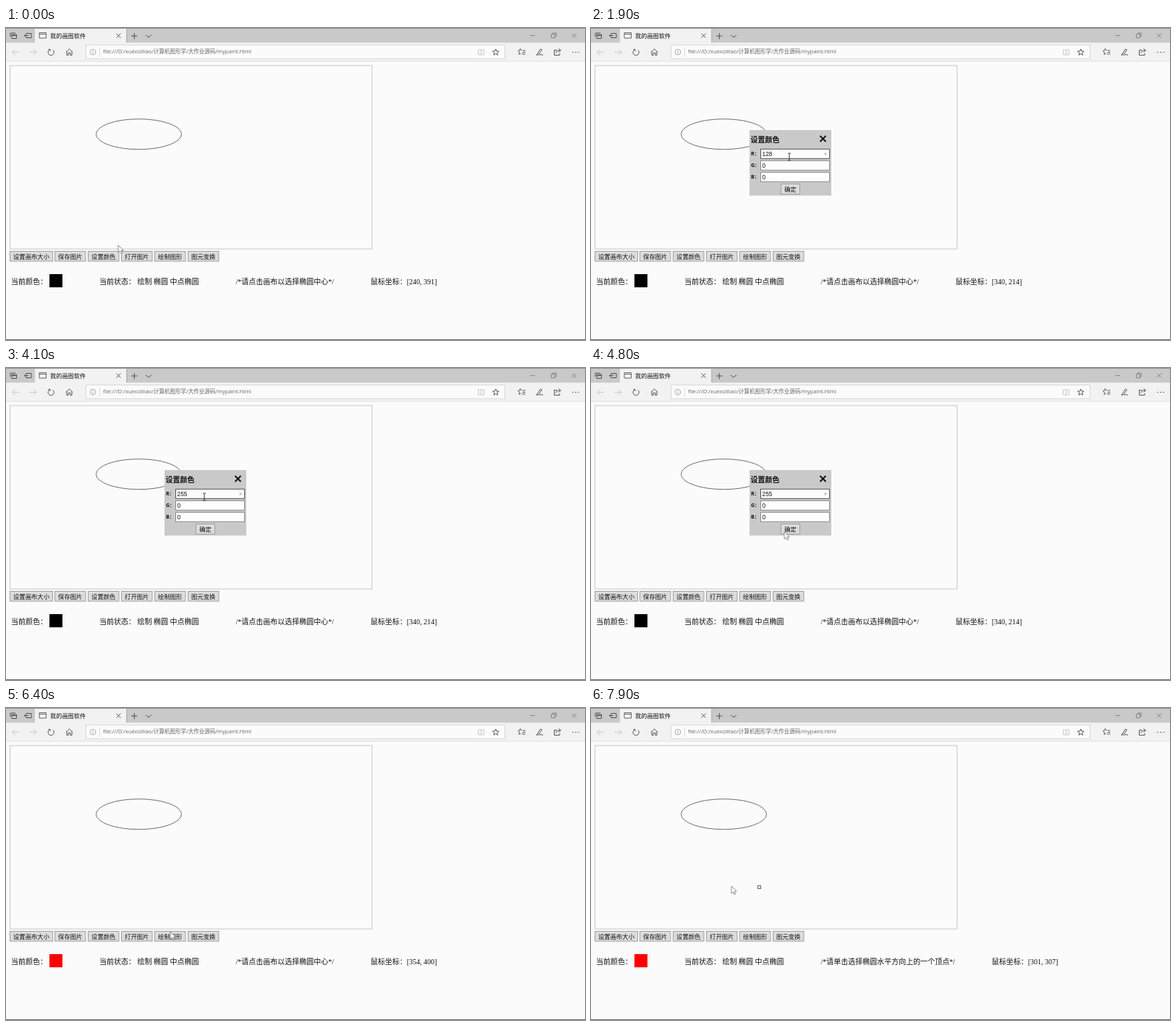
An HTML page for the animation above (8 s loop, 800 px wide and 431 px high).

```html
<!DOCTYPE html>
<html lang="zh-CN">
<head>
<meta charset="utf-8">
<title>我的画图软件</title>
<style>
  html, body { margin: 0; width: 100%; height: 100%; overflow: hidden; background: #fbfbfb; }
  svg { display: block; width: 100vw; height: 100vh; }
  text { fill: #111; white-space: pre; }
  .ui { font-family: "Open Sans", "Noto Sans CJK SC", "Noto Sans CJK", sans-serif; }
  .page { font: 10px "Liberation Serif", "Noto Sans CJK SC", "Noto Sans CJK", serif; }
  .control { font: 8.33px "Liberation Sans", "Noto Sans CJK SC", "Noto Sans CJK", sans-serif; }
  .bold { font-weight: bold; }
  .icon { fill: none; stroke: #444; stroke-width: .9; }
  .faint { stroke: #c4c4c4; }
  .window { stroke: #777; stroke-width: .8; }
  .button { fill: #dcdcdc; stroke: #a0a0a0; }
  .field { fill: #fdfdfd; stroke: #8c8c8c; }
  .field.focused { stroke: #555; }
</style>
</head>
<body>
<svg viewBox="0 0 800 431" preserveAspectRatio="none">
  <rect width="800" height="431" fill="#fbfbfb"/>

  <!-- title bar -->
  <rect width="800" height="20.5" fill="#c9c9c9"/>
  <rect width="800" height="1" fill="#909090"/>
  <rect x="40" y="1" width="126" height="20" fill="#f2f2f2"/>
  <g class="icon">
    <path d="M6 12V7H13M8 9H14.5V14.5H8ZM8 10.5H14.5"/>
    <path d="M28 7.5H35V13.5H28M28 7.5V9M28 13.5V12M25.5 10.5H31M27.5 8.5L25.5 10.5L27.5 12.5"/>
    <path d="M46 6.5H55.5V14H46ZM46 8.5H55.5" stroke="#555"/>
    <path d="M152.5 7.5L158.5 13.5M158.5 7.5L152.5 13.5"/>
    <path d="M173 11H181.5M177.3 7V15.5M193 9.5L197 13L201 9.5"/>
    <path class="window" d="M724.5 10.5H731M753.5 8.5H758.5V13.5H753.5ZM755.5 8.5V6.8H760.3V11.5H758.5M782 7.5L788 13.5M788 7.5L782 13.5"/>
  </g>
  <path d="M167 2V20" stroke="#b0b0b0"/>
  <text class="ui" x="61" y="13.5" font-size="8.2">我的画图软件</text>

  <!-- toolbar -->
  <rect y="20.5" width="800" height="25.5" fill="#f2f2f2"/>
  <path d="M0 46H800" stroke="#dedede"/>
  <rect x="110.5" y="23.5" width="579" height="19" fill="#fbfbfb" stroke="#d8d8d8"/>
  <path d="M129.5 27V40" stroke="#ddd"/>
  <g class="icon">
    <path class="faint" d="M18 33.5H8.5M12.5 29.5L8.5 33.5L12.5 37.5"/>
    <path class="faint" d="M32.5 33.5H42M38 29.5L42 33.5L38 37.5"/>
    <path d="M60 30.2A4.1 4.1 0 1 0 64.8 30.5M58.5 29.5H61V32"/>
    <path d="M82.8 33.5L87.5 29L92.2 33.5M84 32.5V37.5H86.2V34.3H88.8V37.5H91V32.5"/>
    <circle cx="120" cy="33.3" r="3.9" stroke="#999" stroke-width=".8"/>
    <path d="M120 32.5V35.5M120 30.8V31.6" stroke="#999" stroke-width=".8"/>
    <path class="faint" d="M652.5 30H660.5V37H652.5ZM656.5 30V37"/>
    <path id="star"/>
    <path d="M714 31H717.5M713.5 33.5H717.5M713 36H717.5M713 31L711.5 30.5L710.5 28.5L709.5 31L707.5 31.5L709.3 33.5L709 36.5L711.5 35"/>
    <path d="M733 37.5L738.5 29L740.5 30.2L736 36.5L733 37.5M736.5 37.5Q739 35.500 742 37.5"/>
    <path d="M761 30.5H757.5V37.5H765V35M759.5 34.5Q760.5 31 764 31H766M763.5 28.5L766.5 31L763.5 33.5"/>
  </g>
  <path d="M782.5 33.5H784M786.5 33.5H788M790.5 33.5H792" stroke="#444" stroke-width="1.2"/>
  <text class="ui" x="134" y="34.8" font-size="7.5" style="fill:#666">file:///D:/xuexiziliao/计算机图形学/大作业源码/mypaint.html</text>

  <!-- drawing area -->
  <rect x="5.5" y="51.9" width="500.3" height="253.3" fill="#fbfbfb" stroke="#c8c8c8"/>
  <ellipse cx="183.5" cy="146.7" rx="59" ry="21" fill="none" stroke="#555" stroke-width=".85"/>
  <rect id="marker" x="230.5" y="245.5" width="4" height="4" fill="none" stroke="#555" stroke-width=".9"/>
  <g id="buttons"></g>

  <!-- status line -->
  <g class="page">
    <text x="7" y="353.5">当前颜色：</text>
    <rect id="swatch" x="60" y="340" width="18" height="18.2"/>
    <text x="129" y="353.5">当前状态： 绘制 椭圆 中点椭圆</text>
    <text id="hint" x="317.5" y="353.5"></text>
    <text id="readout" y="353.5"></text>
  </g>

  <g id="dialog">
    <rect x="219" y="141" width="113" height="90.5" fill="#c9c9c9"/>
    <text class="ui bold" x="220.5" y="157.7" font-size="10">设置颜色</text>
    <path d="M316.5 149L324.5 157M324.5 149L316.5 157" stroke="#111" stroke-width="1.9"/>
    <g id="fields"></g>
    <path id="clear" d="M322.5 172.3L325.7 175.5M325.7 172.3L322.5 175.5" stroke="#888" stroke-width=".7"/>
  </g>

  <rect y="430" width="800" height="1" fill="#666"/>
  <path id="arrow" d="M0 0V10.2L2.4 8L4.1 11.7L5.8 11L4.2 7.4H7.2Z" fill="#fcfcfc" stroke="#777" stroke-width=".8"/>
  <path id="beam" d="M-2 -5H-.5L0 -4.5L.5 -5H2M0 -4.5V4.5M-2 5H-.5L0 4.5L.5 5H2" fill="none" stroke="#222" stroke-width=".9"/>
</svg>
<script>
const $ = id => document.getElementById(id);
const LOOP = 8000, STEP = 100;

function button(x, y, w, h, label) {
  return `<rect class="button" x="${x + .5}" y="${y + .5}" width="${w - 1}" height="${h - 1}"/>
    <text class="control" x="${x + w / 2}" y="${y + h / 2 + 3.2}" text-anchor="middle">${label}</text>`;
}

function field(name, i) {
  const y = 167 + 16 * i;
  return `<text class="ui bold" x="221" y="${y + 9.3}" font-size="7">${name}：</text>
    <rect class="field" id="box${name}" x="234.5" y="${y + .3}" width="95" height="13"/>
    <text class="control" id="value${name}" x="236.5" y="${y + 9.8}">0</text>`;
}

const labels = ['设置画布大小', '保存图片', '设置颜色', '打开图片', '绘制图形', '图元变换'];
$('buttons').innerHTML = labels.map((label, i) =>
  button(i ? 21 + 46 * i : 5, 308, i ? 43.5 : 60, 14.6, label)).join('');
$('fields').innerHTML = ['R', 'G', 'B'].map(field).join('') + button(262, 215, 27, 15, '确定');

$('star').setAttribute('d', 'M' + Array.from({ length: 10 }, (_, i) => {
  const r = i % 2 ? 2 : 4.6, a = i * Math.PI / 5;
  return `${(676.7 + r * Math.sin(a)).toFixed(2)} ${(33.6 - r * Math.cos(a)).toFixed(2)}`;
}).join('L') + 'Z');

// [time, x, y]
const pointer = [
  [100, 155, 300], [300, 148, 313], [500, 147, 314], [800, 218, 187], [1000, 258, 163],
  [1100, 260, 165], [1500, 274, 178], [4300, 274, 178], [4800, 267, 226], [5500, 267, 226],
  [6200, 228, 305], [6400, 227, 309], [6500, 226, 308], [6900, 232, 247],
  [7300, 232, 247], [7600, 210, 239], [7900, 194, 246]
];
const readouts = [
  [100, 240, 391], [200, 234, 400], [500, 234, 400], [800, 340, 214], [5500, 340, 214],
  [5600, 411, 290], [6200, 354, 400], [6500, 354, 400], [6900, 363, 308],
  [7300, 363, 308], [7600, 328, 296], [7900, 301, 307]
];
// [time, value]
const redValues = [[0, '128'], [2200, '12'], [2400, '1'], [2600, ''], [3300, '2'], [3500, '25'], [3700, '255']];

function sample(keys, t) {
  const i = keys.findIndex(k => k[0] >= t);
  if (i < 0) return keys.at(-1).slice(1);
  if (!i) return keys[0].slice(1);
  const [t0, x0, y0] = keys[i - 1], [t1, x1, y1] = keys[i];
  const p = (t - t0) / (t1 - t0);
  return [x0 + (x1 - x0) * p, y0 + (y1 - y0) * p];
}

const between = (t, from, to) => t >= from && t < to;
const show = (id, on) => $(id).style.display = on ? '' : 'none';

function render(time) {
  const t = Math.floor(time % LOOP / STEP) * STEP;
  const [x, y] = sample(pointer, t);
  const overField = between(t, 1400, 4500);
  const focused = between(t, 1700, 4900);
  const centred = t >= 7000;
  const red = redValues.findLast(k => k[0] <= t)[1];

  show('arrow', !overField);
  show('beam', overField);
  $(overField ? 'beam' : 'arrow').setAttribute('transform', `translate(${x} ${y})`);

  show('dialog', between(t, 500, 4900));
  show('clear', focused && red);
  $('boxR').classList.toggle('focused', focused);
  $('valueR').textContent = red;

  show('marker', centred);
  $('swatch').setAttribute('fill', t < 4900 ? '#000' : '#f00');
  $('hint').textContent = centred ? '/*请单击选择椭圆水平方向上的一个顶点*/' : '/*请点击画布以选择椭圆中心*/';
  $('readout').setAttribute('x', centred ? 553.7 : 503.7);
  $('readout').textContent = `鼠标坐标：[${sample(readouts, t).map(Math.round).join(', ')}]`;
}

const start = performance.now();
function tick() {
  render(performance.now() - start);
  requestAnimationFrame(tick);
}
tick();
</script>
</body>
</html>
```
